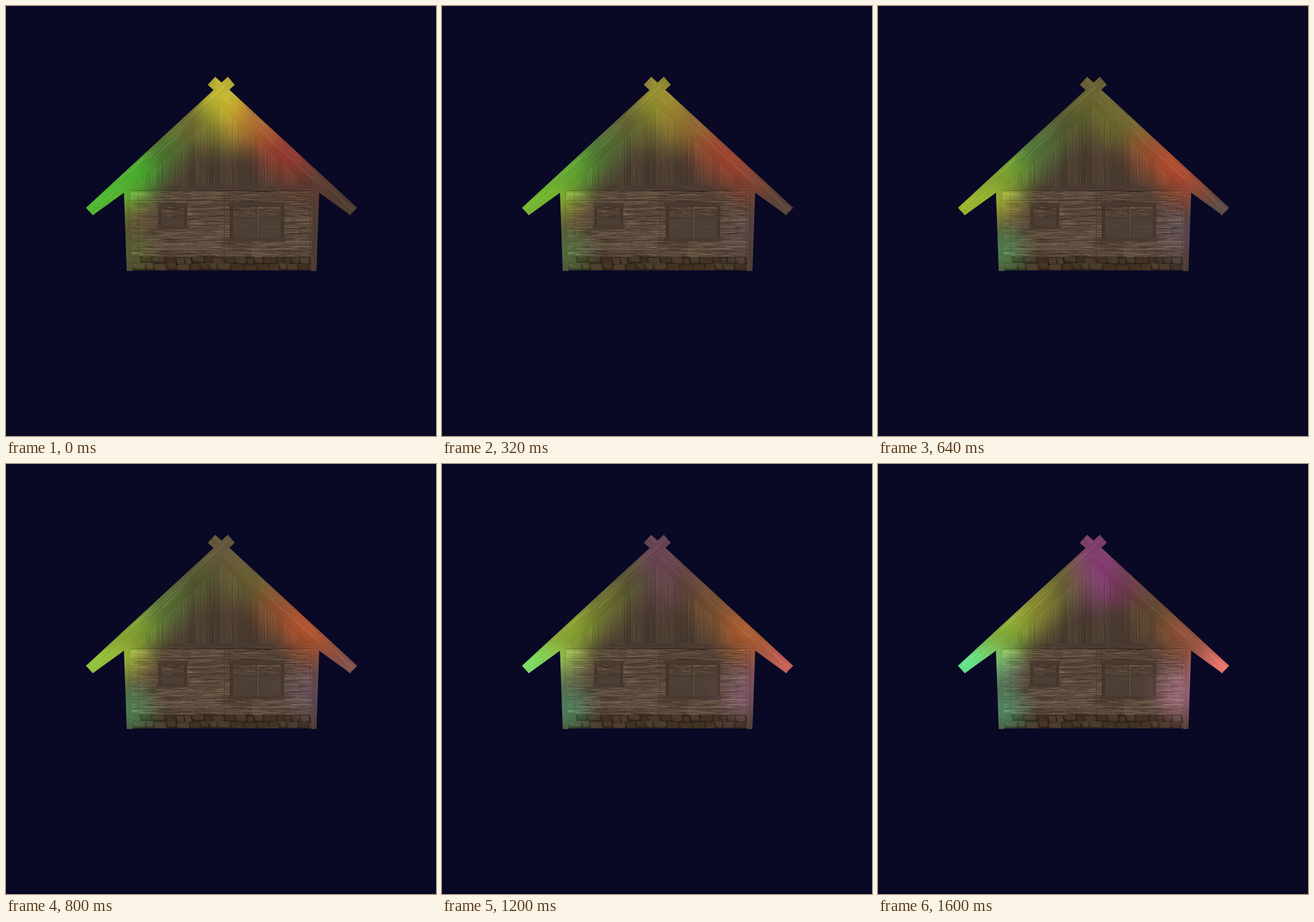
These frames come from a looping animation (748 px wide and 748 px high, 1.68 s). An HTML page with a canvas:

```html
<!DOCTYPE html>
<html lang="en">
<head>
<meta charset="utf-8">
<title>House lights</title>
<style>
html, body { margin: 0; width: 100%; height: 100%; overflow: hidden; background: #090926; }
canvas { display: block; }
</style>
</head>
<body>
<canvas id="stage" width="748" height="748"></canvas>
<script>
const SIZE = 748, LOOP = 1680, STEP = 80;
const stage = document.getElementById('stage').getContext('2d');
const house = document.createElement('canvas');
house.width = house.height = SIZE;
const c = house.getContext('2d');

let seed = 11;
const rand = (a = 0, b = 1) => {
  seed = (seed * 16807) % 2147483647;
  return a + (b - a) * seed / 2147483647;
};

const shape = (...p) => {
  const path = new Path2D();
  for (let i = 0; i < p.length; i += 2) path.lineTo(p[i], p[i + 1]);
  path.closePath();
  return path;
};
const fill = (color, path) => { c.fillStyle = color; c.fill(path); };
const rect = (color, x, y, w, h) => { c.fillStyle = color; c.fillRect(x, y, w, h); };

// Short random streaks along the local x axis
function grain(x, y, w, h, count, alpha, length) {
  for (let i = 0; i < count; i++) {
    const tone = rand() < 0.55 ? '20160f' : 'a58d75';
    const opacity = Math.round(rand(0.2, 1) * alpha * 255).toString(16).padStart(2, '0');
    rect('#' + tone + opacity, rand(x - length / 2, x + w), Math.floor(rand(y, y + h)), rand(length / 4, length), 1);
  }
}

// All outlines run clockwise so that they join into one silhouette
const leftBoard = shape(139, 351, 386, 123, 398, 137, 151, 364);
const rightBoard = shape(364, 123, 611, 351, 598, 364, 351, 137);
const leftEave = shape(150, 363, 216, 302, 216, 317, 151, 364);
const rightEave = shape(534, 302, 600, 363, 599, 364, 534, 317);
const gable = shape(375, 146, 555, 314, 195, 314);
const leftPost = shape(205, 319, 216, 319, 220, 461, 210, 461);
const rightPost = shape(534, 319, 545, 319, 540, 461, 531, 461);
const wall = shape(214, 319, 536, 319, 532, 460, 218, 460);
const beam = shape(205, 312, 545, 312, 545, 322, 205, 322);
const silhouette = new Path2D();
for (const part of [gable, wall, beam, leftPost, rightPost, leftEave, rightEave, leftBoard, rightBoard])
  silhouette.addPath(part);

function inside(path, draw) {
  c.save();
  c.clip(path);
  draw();
  c.restore();
}

function drawGable() {
  fill('#4b3c31', gable);
  inside(gable, () => {
    for (let x = 196; x < 556; x += 11) {
      rect(rand() < 0.5 ? '#51413480' : '#43352b80', x, 140, 11, 176);
      rect('#2b211b77', x, 140, 1, 176);
      rect('#78644f55', x + 1, 140, 1, 176);
    }
    c.translate(0, SIZE);
    c.rotate(-Math.PI / 2);
    grain(430, 195, 180, 360, 400, 0.13, 70);
  });
  inside(gable, () => {
    c.lineWidth = 11;
    c.strokeStyle = '#49382d';
    c.stroke(shape(375, 166, 598, 371, 152, 371));
    c.lineWidth = 1;
    c.strokeStyle = '#35281f99';
    c.stroke(shape(375, 174, 598, 379, 152, 379));
  });
}

function drawWall() {
  fill('#584839', wall);
  inside(wall, () => {
    const rows = [321, 338, 346, 365, 387, 407, 425, 437];
    rows.slice(0, -1).forEach((y, i) => {
      for (let x = 216; x < 534; x += 53)
        rect(rand() < 0.5 ? '#66554555' : '#4e3e3355', x, y, 53, rows[i + 1] - y);
    });
    grain(216, 322, 318, 114, 1800, 0.3, 38);
    rows.slice(1, -1).forEach(y => rect('#33271f88', 216, y, 318, 1));
    for (const x of [230, 380, 529]) rect('#352a2299', x, 322, 1, 114);
    rect('#806c5855', 381, 322, 1, 114);
  });
}

function drawStones() {
  rect('#2e241c', 219, 436, 312, 24);
  inside(shape(219, 436, 531, 436, 531, 460, 219, 460), () => {
    for (let row = 0; row < 2; row++) {
      for (let x = 214 + row * 6; x < 532;) {
        const w = rand(12, 24), y = 436 + row * 12 + rand(-2, 2), h = rand(10, 13), lean = rand(-4, 4);
        const tone = rand(-9, 9);
        fill(`rgb(${70 + tone},${54 + tone},${39 + tone})`,
          shape(x + lean, y + 1, x + w - 3, y, x + w - 1, y + h - 3, x + w - 4, y + h, x + 2, y + h - 1, x, y + 4));
        x += w;
      }
    }
    grain(219, 436, 312, 24, 200, 0.15, 8);
  });
}

function drawWindow(x, y, w, h, side, split) {
  const wood = '#493a2f';
  rect('#4b3d3299', x, y, w, h);
  rect('#4c3f35aa', x, y + 25, w, h - 25);
  grain(x + 9, y + 6, w - 22, 18, w, 0.25, 16);
  rect('#44342a', x, y, side, h);
  rect('#44342a', x + w - side, y, side, h);
  rect(wood, x - 2, y - 1, w + 4, 7);
  rect(wood, x - 3, y + h - 6, w + 5, 7);
  rect(wood, x, y + 25, w, 3);
  if (split) {
    rect(wood, split - 1, y, 4, h);
    rect('#695747', split + 2, y + 6, 1, h - 12);
  }
  rect('#2f241d88', x + side, y + 6, w - 2 * side, 1);
}

function drawBoard(path, x, y, angle) {
  fill('#4e3d33', path);
  inside(path, () => {
    c.translate(x, y);
    c.rotate(angle);
    grain(0, 0, 340, 20, 150, 0.15, 60);
    rect('#35281f55', 0, 12, 340, 1);
    rect('#806a5530', 0, 6, 340, 1);
  });
}

drawGable();
drawWall();
drawStones();
drawWindow(265, 343, 50, 45, 5);
drawWindow(389, 342, 95, 67, 6, 435);
fill('#493a30', beam);
rect('#33271f', 214, 321, 322, 1);
grain(205, 313, 330, 8, 60, 0.15, 40);
for (const post of [leftPost, rightPost]) {
  fill('#503e33', post);
  inside(post, () => {
    rect('#36291f66', post === leftPost ? 214 : 536, 319, 1, 142);
    c.translate(0, SIZE);
    c.rotate(-Math.PI / 2);
    grain(288, 204, 140, 342, 250, 0.12, 40);
  });
}
const slope = Math.atan2(228, 247);
fill('#4c3b31', leftEave);
fill('#4c3b31', rightEave);
drawBoard(rightBoard, 364, 123, slope);
drawBoard(leftBoard, 139, 351, -slope);

// Each light: x, y, radius, then the colour it adds at each key time
const keyTimes = [0, 640, 1040, 1600];
const lights = [
  [375, 142, 85, '707800 1c2600 100818 2f0038'],
  [380, 212, 75, '283000 080a00 060208 20002a'],
  [430, 202, 82, '542800 202800 0c0e00 1c0018'],
  [485, 254, 82, '440000 4c1200 381800 140c00'],
  [537, 299, 82, '100000 500c00 602000 401408'],
  [604, 355, 85, '000000 101014 6c1c20 9c3838'],
  [532, 398, 82, '000000 080818 180c24 40203c'],
  [320, 200, 82, '1c2800 081c00 041400 182200'],
  [265, 250, 82, '003400 043608 1a3000 3a4a00'],
  [212, 298, 85, '007000 306000 3c6000 306808'],
  [148, 351, 85, '027c00 4d7800 3a9a20 16a85c'],
  [218, 350, 58, '141000 242400 202c0c 0c3028'],
  [213, 425, 75, '081c00 003c18 003c24 00442c']
].map(([x, y, radius, keys]) => ({
  x, y, radius,
  colors: keys.split(' ').map(hex => [0, 2, 4].map(i => parseInt(hex.slice(i, i + 2), 16)))
}));

function glow({ x, y, radius, colors }, time) {
  const k = time < keyTimes[1] ? 0 : time < keyTimes[2] ? 1 : 2;
  const mix = (time - keyTimes[k]) / (keyTimes[k + 1] - keyTimes[k]);
  const rgb = colors[k].map((v, i) => Math.round(v + (colors[k + 1][i] - v) * mix));
  const gradient = stage.createRadialGradient(x, y, 0, x, y, radius);
  for (let i = 0; i <= 8; i++)
    gradient.addColorStop(i / 8, `rgba(${rgb},${(1 + Math.cos(Math.PI * i / 8)) / 2})`);
  stage.fillStyle = gradient;
  stage.fillRect(x - radius, y - radius, 2 * radius, 2 * radius);
}

function frame() {
  const time = Math.floor(performance.now() % LOOP / STEP) * STEP;
  stage.fillStyle = '#090926';
  stage.fillRect(0, 0, SIZE, SIZE);
  stage.drawImage(house, 0, 0);
  stage.save();
  stage.clip(silhouette);
  stage.globalCompositeOperation = 'lighter';
  lights.forEach(light => glow(light, time));
  stage.restore();
  requestAnimationFrame(frame);
}
frame();
</script>
</body>
</html>
```
